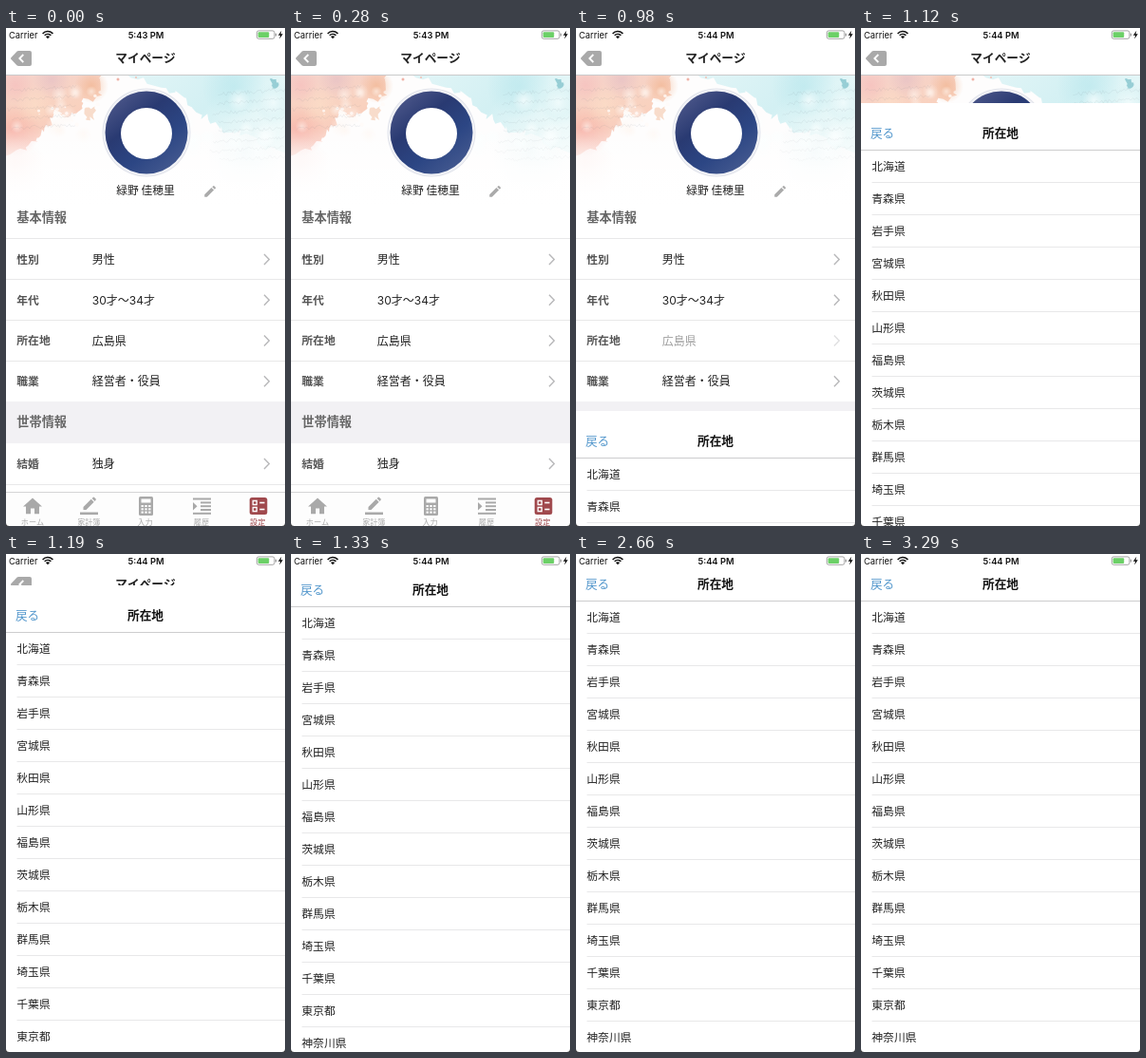
Recreate the animation shown at these times as an HTML page with a canvas. Size 294 by 524 pixels, loop 3360 ms.

```html
<!DOCTYPE html>
<html lang="ja">
<head>
<meta charset="utf-8">
<title>マイページ</title>
<style>
html, body { margin: 0; width: 100%; height: 100%; overflow: hidden; background: #fff; }
canvas { display: block; width: 294px; height: 524px; }
</style>
</head>
<body>
<canvas id="stage"></canvas>
<script>
const W = 294, H = 524, LOOP = 3360, TICK = 70;
const FONT = 'Inter, "Noto Sans CJK JP", "Noto Sans CJK", sans-serif';
const JP = '"Noto Sans CJK JP", "Noto Sans CJK", sans-serif';
const GREY = '#a9a9a9', INK = '#222', RED = '#a0494d', RULE = '#e8e8e9';
const PLACES = ['北海道', '青森県', '岩手県', '宮城県', '秋田県', '山形県', '福島県',
  '茨城県', '栃木県', '群馬県', '埼玉県', '千葉県', '東京都', '神奈川県'];
const ROWS = [['性別', '男性'], ['年代', '30才〜34才'], ['所在地', '広島県'], ['職業', '経営者・役員']];
const ROW_TOP = 222, ROW_H = 42.75;

const canvas = document.getElementById('stage');
const dpr = Math.max(1, window.devicePixelRatio || 1);
const view = setup(canvas);
let g = view;

function setup(c) {
  c.width = W * dpr;
  c.height = H * dpr;
  const x = c.getContext('2d');
  x.scale(dpr, dpr);
  return x;
}

// y is the visual centre of the line
function text(s, x, y, size, { color = INK, weight = 400, align = 'left', font = FONT } = {}) {
  g.font = `${weight} ${size}px ${font}`;
  g.textAlign = align;
  g.fillStyle = color;
  g.fillText(s, x, y + size * 0.38);
}

function rect(x, y, w, h, color) {
  g.fillStyle = color;
  g.fillRect(x, y, w, h);
}

function rule(x, y, color = RULE) {
  rect(x, Math.round(y), W, 1, color);
}

function disc(x, y, r, color) {
  g.fillStyle = color;
  g.beginPath();
  g.arc(x, y, r, 0, 7);
  g.fill();
}

function round(x, y, w, h, r, color) {
  g.fillStyle = color;
  g.beginPath();
  g.roundRect(x, y, w, h, r);
  g.fill();
}

function at(x, y, draw) {
  g.save();
  g.translate(x, y);
  draw();
  g.restore();
}

function fill(d, color) {
  g.fillStyle = color;
  g.fill(new Path2D(d), 'evenodd');
}

function stroke(d, color, width) {
  g.strokeStyle = color;
  g.lineWidth = width;
  g.stroke(new Path2D(d));
}

function random(seed) {
  return () => (seed = (seed * 16807) % 2147483647) / 2147483647;
}

// ragged watercolour edge through a few points
function wash(points, color, rnd, rough) {
  g.fillStyle = color;
  g.beginPath();
  points.forEach(([x, y], i) => {
    const [nx, ny] = points[(i + 1) % points.length];
    for (let k = 0; k < 1; k += 0.2) {
      g.lineTo(x + (nx - x) * k + (rnd() - 0.5) * rough, y + (ny - y) * k + (rnd() - 0.5) * rough);
    }
  });
  g.fill();
}

function glow(x, y, r, rgb, a) {
  const grad = g.createRadialGradient(x, y, 0, x, y, r);
  grad.addColorStop(0, `rgba(${rgb},${a})`);
  grad.addColorStop(1, `rgba(${rgb},0)`);
  g.fillStyle = grad;
  g.fillRect(x - r, y - r, 2 * r, 2 * r);
}

function fade(x0, y0, x1, y1, ...colors) {
  const grad = g.createLinearGradient(x0, y0, x1, y1);
  colors.forEach((c, i) => grad.addColorStop(i / (colors.length - 1), c));
  return grad;
}

function banner() {
  const rnd = random(77);
  g.save();
  g.beginPath();
  g.rect(0, 50, W, 142);
  g.clip();
  rect(0, 50, W, 142, '#fefdfd');

  const right = [[122, 45], [300, 45], [300, 132], [272, 122], [250, 112], [232, 108],
    [214, 98], [200, 88], [186, 72], [160, 62]];
  wash(right, fade(150, 50, 250, 140, '#dff4f6', '#d3f0f3', '#eefafa'), rnd, 8);
  const left = [[-5, 45], [99, 45], [103, 60], [97, 74], [80, 77], [76, 90], [62, 92],
    [54, 88], [46, 100], [38, 110], [30, 122], [16, 127], [-5, 138]];
  wash(left, fade(0, 50, 20, 140, '#f5d3cb', '#f9d2bf', '#f8c6bc'), rnd, 7);

  glow(48, 54, 20, '226,188,196', 0.6);
  glow(8, 108, 28, '246,160,156', 0.5);
  glow(10, 60, 20, '246,182,184', 0.5);
  glow(90, 61, 18, '240,176,136', 0.6);
  glow(30, 80, 20, '252,222,200', 0.7);
  glow(10, 146, 32, '252,226,222', 0.6);
  glow(240, 62, 34, '182,230,236', 0.6);
  glow(286, 80, 24, '186,230,234', 0.45);
  glow(255, 130, 44, '232,246,247', 0.7);
  for (let i = 0; i < 12; i++) {
    glow(10 + rnd() * 80, 60 + rnd() * 60, 5 + rnd() * 7, '255,246,240', 0.6);
    glow(160 + rnd() * 130, 55 + rnd() * 75, 6 + rnd() * 10, '250,255,255', 0.7);
  }
  for (let i = 0; i < 14; i++) {
    disc(30 + rnd() * 72, 70 + rnd() * 36, 0.5 + rnd() * 1.8, 'rgba(255,250,247,.8)');
  }
  wash([[82, 85], [92, 82], [94, 93], [85, 97]], '#f8dccb', rnd, 5);
  wash([[279, 54], [286, 54], [287, 61], [280, 63]], 'rgba(120,190,200,.7)', rnd, 3);
  disc(118, 54, 1.5, '#f0b3a8');
  disc(137, 52, 1, '#f0c0b4');

  // faint handwriting
  g.strokeStyle = 'rgba(120,130,135,.16)';
  g.lineWidth = 0.6;
  for (const [x0, x1, y0, n] of [[0, 74, 66, 5], [214, 294, 70, 8]]) {
    for (let i = 0; i < n; i++) {
      g.beginPath();
      for (let x = x0 + rnd() * 12; x < x1; x += 1.5) {
        g.lineTo(x, y0 + i * 10 - (x - x0) * 0.06 + (rnd() - 0.5) * 4);
      }
      g.stroke();
    }
  }
  rect(0, 105, W, 87, fade(0, 105, 0, 190, 'rgba(255,255,255,0)', 'rgba(255,255,255,.75)', '#fff'));
  g.restore();
}

function avatar() {
  disc(148, 110, 46.5, '#e2e4eb');
  disc(148, 110, 45.5, '#f2f3f7');
  disc(148, 110, 43.5, fade(115, 75, 175, 150, '#4a5588', '#293a72', '#2c4684', '#44598f'));
  disc(148, 111, 27, '#fff');
}

function pencil(x, y, s, color) {
  at(x, y, () => {
    g.scale(s, s);
    fill('M-6 6V3L2.2-5.2L5.2-2.2L-3 6ZM3.1-6.1L4.4-7.2Q5-7.6 5.6-7.1L7.2-5.5Q7.6-5 7.2-4.4L6.1-3.1Z', color);
  });
}

function chevron(y) {
  stroke(`M272 ${y - 5.5}L277.3 ${y}L272 ${y + 5.5}`, '#b8b8ba', 1.4);
}

function heading(s, y) {
  text(s, 11.3, y, 13.2, { color: '#666', weight: 700 });
}

function row(label, value, y, alpha = 1) {
  text(label, 11.3, y, 11.8, { color: '#555', weight: 700 });
  g.globalAlpha = alpha;
  text(value, 90.8, y, 12);
  chevron(y);
  g.globalAlpha = 1;
}

function tabs() {
  rect(0, 488, W, 36, '#fdfdfd');
  rule(0, 488, '#d4d4d6');
  ['ホーム', '家計簿', '入力', '履歴', '設定'].forEach((s, i) =>
    text(s, 28 + i * 59.3, 520, 8.1, { color: i < 4 ? GREY : RED, align: 'center', font: JP }));

  at(28, 503, () => fill('M0-8.6L10 .5H7V8.3H2V2.5H-2V8.3H-7V.5H-10Z', GREY));

  pencil(87.5, 501, 1, GREY);
  rect(78, 509.5, 19, 2.6, GREY);

  at(147.5, 503, () => {
    round(-7.5, -10, 15, 20, 1.5, GREY);
    rect(-5, -7.5, 10, 4, '#fff');
    for (let i = 0; i < 9; i++) rect(-5 + (i % 3) * 3.8, -1 + Math.floor(i / 3) * 3.3, 2.4, 2, '#fff');
  });

  at(206.5, 503, () => {
    rect(-9.5, -8.5, 19, 2, GREY);
    rect(-1.5, -4.6, 11, 2, GREY);
    rect(-1.5, -0.8, 11, 2, GREY);
    rect(-1.5, 3, 11, 2, GREY);
    rect(-9.5, 6.8, 19, 2, GREY);
    fill('M-9.5-4L-5 .2L-9.5 4.4Z', GREY);
  });

  at(266, 503, () => {
    round(-9.3, -9, 18.6, 18, 2.5, RED);
    for (const y of [-5.5, 1.5]) {
      stroke(`M-5.8 ${y}h4v4h-4Z`, '#fff', 1.3);
      rect(1.3, y + 1.2, 5.2, 1.6, '#fff');
    }
  });
}

function navBar() {
  rect(0, 0, W, 49.5, '#fff');
  rule(0, 49, '#cacacb');
  fill('M5.3 31.2L11.4 24.8Q12.2 24 13.3 24H25Q27 24 27 26V38Q27 40 25 40H13.3Q12.2 40 11.4 39.2L5.3 32.8Q4.6 32 5.3 31.2Z', GREY);
  stroke('M18.3 28L14.3 32L18.3 36', '#fff', 1.8);
  text('マイページ', 147, 31, 12.7, { weight: 700, align: 'center', font: JP });
}

function profile() {
  rect(0, 0, W, H, '#fff');
  banner();
  avatar();
  text('緑野 佳穂里', 147, 171, 11.8, { align: 'center', font: JP });
  pencil(214.5, 172.5, 0.88, '#aaa');
  heading('基本情報', 199);
  rule(0, ROW_TOP - 1);
  ROWS.forEach((r, i) => {
    const top = ROW_TOP + i * ROW_H;
    if (i !== 2) row(r[0], r[1], top + 21.5);
    if (i < 3) rule(0, top + ROW_H - 0.5);
  });
  rect(0, 393, W, 44, '#f2f1f4');
  heading('世帯情報', 414);
  row('結婚', '独身', 458.5);
  rule(0, 480);
  tabs();
  navBar();
}

function picker(y) {
  at(0, Math.round(y), () => {
    rect(0, 0, W, H, '#fff');
    text('戻る', 10, 31, 12.6, { color: '#5397cc', font: JP });
    text('所在地', 147, 31, 12.7, { weight: 700, align: 'center', color: '#111' });
    rule(0, 49, '#cdcdce');
    PLACES.forEach((s, i) => {
      text(s, 11.3, 66.4 + i * 34, 11.8);
      rule(11.5, 83 + i * 34);
    });
  });
}

function statusBar(clock) {
  text('Carrier', 3, 7, 9.3, { color: '#111' });
  text(clock, 147.5, 7, 9.3, { weight: 600, align: 'center', color: '#111' });
  g.strokeStyle = '#111';
  g.lineWidth = 1.5;
  for (const r of [4.6, 7.4]) {
    g.beginPath();
    g.arc(44, 11, r, -Math.PI * 0.76, -Math.PI * 0.24);
    g.stroke();
  }
  fill('M44 11.3L41.9 9.1Q44 7.4 46.1 9.1Z', '#111');
  g.strokeStyle = '#8d8d8d';
  g.lineWidth = 0.8;
  g.beginPath();
  g.roundRect(264.3, 2.9, 18.6, 8.4, 2);
  g.stroke();
  round(265.6, 4.2, 11.6, 5.8, 1, '#6cd067');
  rect(283.8, 5.7, 1.1, 2.8, '#8d8d8d');
  fill('M290.3 2.8L286.8 7.7H289L288.2 11.4L291.8 6.3H289.5Z', '#111');
}

function corners() {
  fill('M0 520.5Q0 524 3.5 524H0ZM294 520.5Q294 524 290.5 524H294Z', '#333');
}

const clamp = v => Math.min(1, Math.max(0, v));
const smooth = v => v * v * (3 - 2 * v);

// spring settling from the bottom edge to the top
function sheetY(t) {
  if (t < 930) return H;
  if (t > 1610) return 0;
  const s = (t - 980) / 1000;
  const u = Math.max(0, 0.91 + 17.5 * s - 7.5 * s * (s - 0.14));
  return H * (1 + u) * Math.exp(-u);
}

function pressAlpha(t) {
  return 1 - 0.8 * smooth(clamp((t - 760) / 150)) + 0.8 * smooth(clamp((t - 890) / 250));
}

const page = document.createElement('canvas');
g = setup(page);
profile();
g = view;

function frame(now) {
  const t = Math.floor((now % LOOP) / TICK) * TICK;
  const y = sheetY(t);
  g.drawImage(page, 0, 0, W, H);
  row(ROWS[2][0], ROWS[2][1], ROW_TOP + 2 * ROW_H + 21.5, pressAlpha(t));
  if (y < H) picker(y);
  statusBar(t < 560 ? '5:43 PM' : '5:44 PM');
  corners();
}

const start = performance.now();
function loop() {
  frame(performance.now() - start);
  requestAnimationFrame(loop);
}
loop();
</script>
</body>
</html>
```
